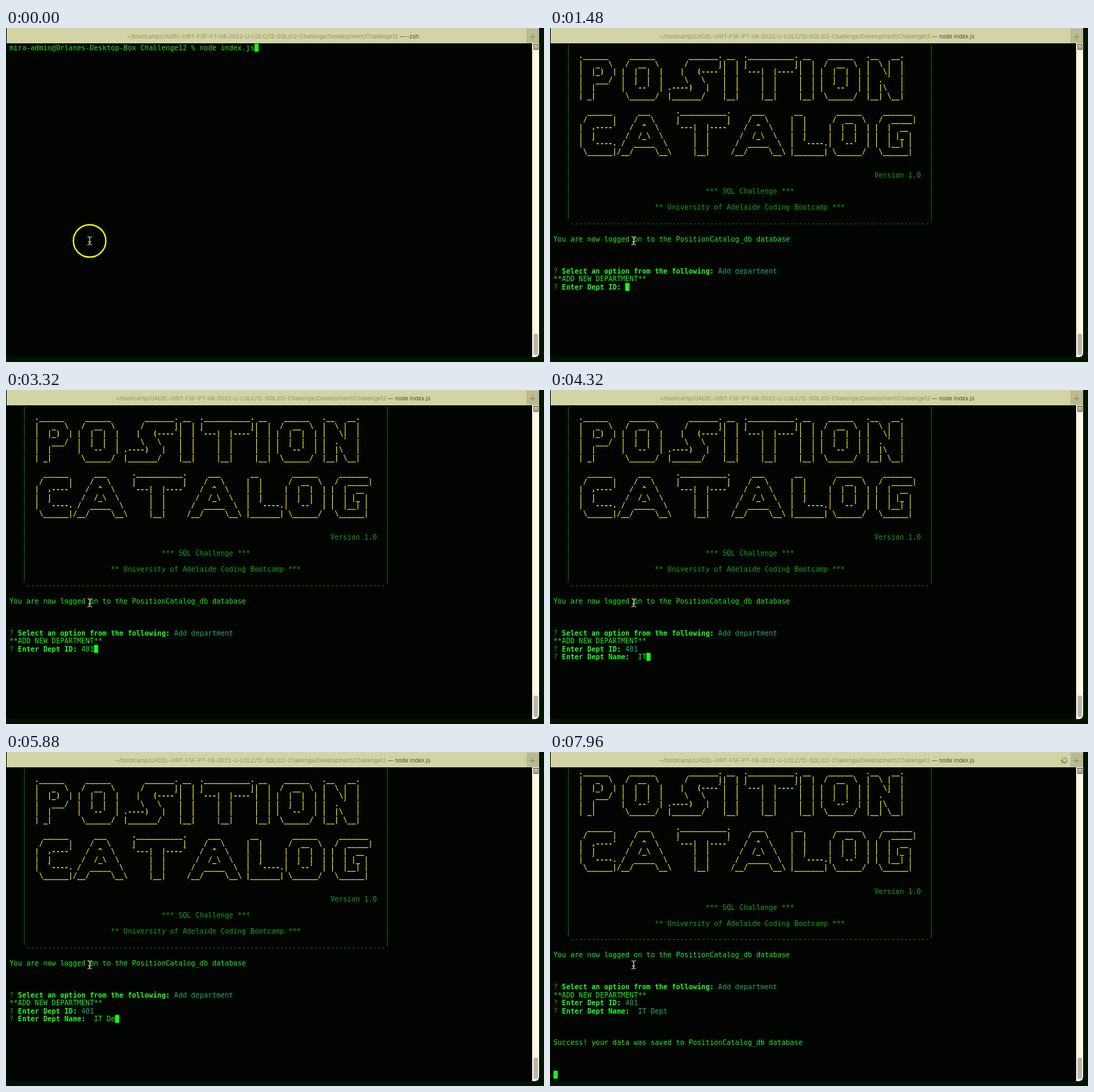
Animation of 772x480 px, one loop 8 s. Source, as an HTML page with a canvas:

```html
<!DOCTYPE html>
<html lang="en">
<head>
<meta charset="utf-8">
<title>Terminal session</title>
<style>
  html, body { margin: 0; width: 100%; height: 100%; overflow: hidden; background: #001400; }
  canvas { display: block; }
</style>
</head>
<body>
<canvas id="stage" width="772" height="480"></canvas>
<script>
const ctx = document.getElementById("stage").getContext("2d");
const LOOP = 8000;
const CELL = 6.06, PITCH = 11.46, LEFT = 5, BASE = 31.8;
const MONO = '10px "DejaVu Sans Mono", monospace';
const SANS = '8.1px Inter, sans-serif';

const GREEN = "#1cf01c", BOLD = "#1eff1e", DIM = "#12a812", FRAME = "#0c8a0c";
const YELLOW = "#dede28", TEAL = "#1eab78";

const PATH = "~/bootcamp/UADEL-VIRT-FSF-PT-08-2022-U-LOLC/12-SQL/02-Challenge/Development/Challenge12";
const SHELL = "mira-admin@Orlanes-Desktop-Box Challenge12 % node index.js";
const DB = "PositionCatalog_db";
const OPTIONS = [
  "View all departments", "View all roles", "View all employees",
  "Bonus: View all employees by department", "Bonus: View all employees by manager",
  "Add department", "Add role", "Add employee", "Update employee role", "Quit"
];

// When each step of the session happens, in ms
const AT = { run: 60, menu: 200, pick: 1280, id: 3360, save: 7440, busy: 7600, ringOff: 1440 };
const DOWN = [320, 400, 480, 560, 640];
const ID_KEYS = [2200, 2680, 3000];
const NAME_KEYS = [3800, 4100, 5200, 5500, 5760, 6160, 6520];

// Block letters: width, then six rows
const LETTERS = {
  P: [10, ".______", "|   _  \\", "|  |_)  |", "|   ___/", "|  |", "| _|"],
  O: [11, "  ______", " /  __  \\", "|  |  |  |", "|  |  |  |", "|  `--'  |", " \\______/"],
  S: [13, "     _______.", "    /       |", "   |   (----`", "    \\   \\", ".----)   |", "|_______/"],
  I: [5, " __", "|  |", "|  |", "|  |", "|  |", "|__|"],
  T: [13, ".___________.", "|           |", "`---|  |----`", "    |  |", "    |  |", "    |__|"],
  N: [10, ".__   __.", "|  \\ |  |", "|   \\|  |", "|  . `  |", "|  |\\   |", "|__| \\__|"],
  C: [9, "  ______", " /      |", "|  ,----'", "|  |", "|  `----.", " \\______|"],
  A: [14, "     ___", "    /   \\", "   /  ^  \\", "  /  /_\\  \\", " /  _____  \\", "/__/     \\__\\"],
  L: [9, " __", "|  |", "|  |", "|  |", "|  `----.", "|_______|"],
  G: [10, "  _______", " /  _____|", "|  |  __", "|  | |_ |", "|  |__| |", " \\______|"]
};

function banner(word) {
  return [1, 2, 3, 4, 5, 6].map(i =>
    [...word].map(c => LETTERS[c][i].padEnd(LETTERS[c][0])).join(""));
}
const TOP = banner("POSITION"), BOTTOM = banner("CATALOG");

function put(row, col, text, color = GREEN, bold = false) {
  ctx.font = (bold ? "bold " : "") + MONO;
  ctx.fillStyle = color;
  [...text].forEach((c, i) => {
    if (c !== " ") ctx.fillText(c, LEFT + (col + i) * CELL, BASE + row * PITCH);
  });
}

function block(row, col) {
  ctx.fillStyle = "#12ff18";
  ctx.fillRect(LEFT + col * CELL, 22.6 + row * PITCH, CELL, 11.4);
}

function question(row, text) {
  put(row, 0, "?", DIM);
  put(row, 2, text, BOLD, true);
}

function typed(text, keys, t) {
  return text.slice(0, keys.filter(k => t >= k).length);
}

function input(row, col, text, done) {
  put(row, col, text, done ? TEAL : GREEN);
  if (!done) block(row, col + text.length);
}

function logo(shift) {
  for (let r = 0; r < 22 - shift; r++) {
    put(r, 3, "|", FRAME);
    put(r, 89, "|", FRAME);
  }
  put(22 - shift, 3, "`" + "-".repeat(85) + "'", FRAME);
  TOP.forEach((s, i) => put(1 + i - shift, 6, s, YELLOW, true));
  BOTTOM.forEach((s, i) => put(8 + i - shift, 6, s, YELLOW, true));
  put(16 - shift, 76, "Version 1.0", DIM);
  put(18 - shift, 36, "*** SQL Challenge ***", DIM);
  put(20 - shift, 24, "** University of Adelaide Coding Bootcamp ***", DIM);
  put(24 - shift, 0, "You are now logged on to the " + DB + " database");
}

function session(t) {
  if (t < AT.menu) {
    put(0, 0, SHELL);
    if (t < AT.run) block(0, SHELL.length);
    else block(1, 0);
    return;
  }
  const saved = t >= AT.save, top = saved ? 27 : 28;
  logo(saved ? 1 : 0);
  question(top, "Select an option from the following:");
  if (t < AT.pick) {
    const current = DOWN.filter(k => t >= k).length;
    OPTIONS.forEach((s, i) => put(top + 1 + i, 2, s, i === current ? TEAL : GREEN));
    put(top + 1 + current, 0, "❯", TEAL);
    return;
  }
  put(top, 39, "Add department", TEAL);
  put(top + 1, 0, "**ADD NEW DEPARTMENT**");
  question(top + 2, "Enter Dept ID:");
  input(top + 2, 17, typed("401", ID_KEYS, t), t >= AT.id);
  if (t < AT.id) return;
  question(top + 3, "Enter Dept Name:");
  input(top + 3, 20, typed("IT Dept", NAME_KEYS, t), saved);
  if (saved) {
    put(34, 0, "Success! your data was saved to " + DB + " database");
    block(38, 0);
  }
}

function line(x1, y1, x2, y2) {
  ctx.beginPath();
  ctx.moveTo(x1, y1);
  ctx.lineTo(x2, y2);
  ctx.stroke();
}

function spinner(t) {
  const head = Math.floor((t - AT.busy) / 80);
  ctx.lineWidth = 1.2;
  for (let i = 0; i < 8; i++) {
    const a = i * Math.PI / 4, age = ((head - i) % 8 + 8) % 8;
    ctx.strokeStyle = `rgba(45,45,35,${0.95 - age * 0.09})`;
    line(738 + 2 * Math.cos(a), 12 + 2 * Math.sin(a), 738 + 5 * Math.cos(a), 12 + 5 * Math.sin(a));
  }
}

function titleBar(t) {
  ctx.fillStyle = "#d2d4a4";
  ctx.fillRect(1, 0, 764, 22);
  ctx.fillStyle = "#bcb992";
  ctx.fillRect(747, 1, 18, 21);
  ctx.strokeStyle = "#85836a";
  ctx.lineWidth = 1;
  line(752, 12.5, 759, 12.5);
  line(755.5, 9, 755.5, 16);

  const job = t < AT.run ? "-zsh" : "node index.js";
  const tail = " — " + job;
  ctx.font = SANS;
  const pathWidth = ctx.measureText(PATH).width;
  const x = 383 - (pathWidth + ctx.measureText(tail).width) / 2;
  ctx.fillStyle = "#918e6c";
  ctx.fillText(PATH, x, 15);
  ctx.fillStyle = "#4c4b39";
  ctx.fillText(tail, x + pathWidth, 15);
  if (t >= AT.busy) spinner(t);
}

function scrollBar() {
  ctx.fillStyle = "#fafae4";
  ctx.fillRect(755, 22, 10, 451);
  ctx.fillStyle = "#b9b8b0";
  ctx.beginPath();
  ctx.roundRect(757, 439, 6.5, 31, 3);
  ctx.fill();
  ctx.strokeStyle = "#33332a";
  ctx.lineWidth = 1;
  ctx.strokeRect(757.5, 23.5, 6, 7);
  line(759, 26, 762, 26);
  line(759, 28.5, 762, 28.5);
}

function pointer(t) {
  ctx.strokeStyle = "#c4c49c";
  ctx.lineWidth = 1.3;
  line(120, 301, 120, 311);
  for (const [y, s] of [[299.5, 1], [312, -1]]) {
    line(117, y, 120, y + 1.8 * s);
    line(123, y, 120, y + 1.8 * s);
  }
  line(118, 307.5, 122, 307.5);
  if (t < AT.ringOff) {
    ctx.strokeStyle = "#ffff00";
    ctx.lineWidth = 2;
    ctx.beginPath();
    ctx.arc(120, 306, 23.3, 0, Math.PI * 2);
    ctx.stroke();
  }
}

function draw(t) {
  ctx.fillStyle = "#001400";
  ctx.fillRect(0, 0, 772, 480);
  ctx.save();
  ctx.beginPath();
  ctx.roundRect(1, -10, 764, 483, 6);
  ctx.clip();
  ctx.fillStyle = "#020402";
  ctx.fillRect(0, 0, 772, 480);
  session(t);
  titleBar(t);
  scrollBar();
  ctx.restore();
  pointer(t);
}

const start = performance.now();
function tick() {
  draw((performance.now() - start) % LOOP);
  requestAnimationFrame(tick);
}
tick();
</script>
</body>
</html>
```
